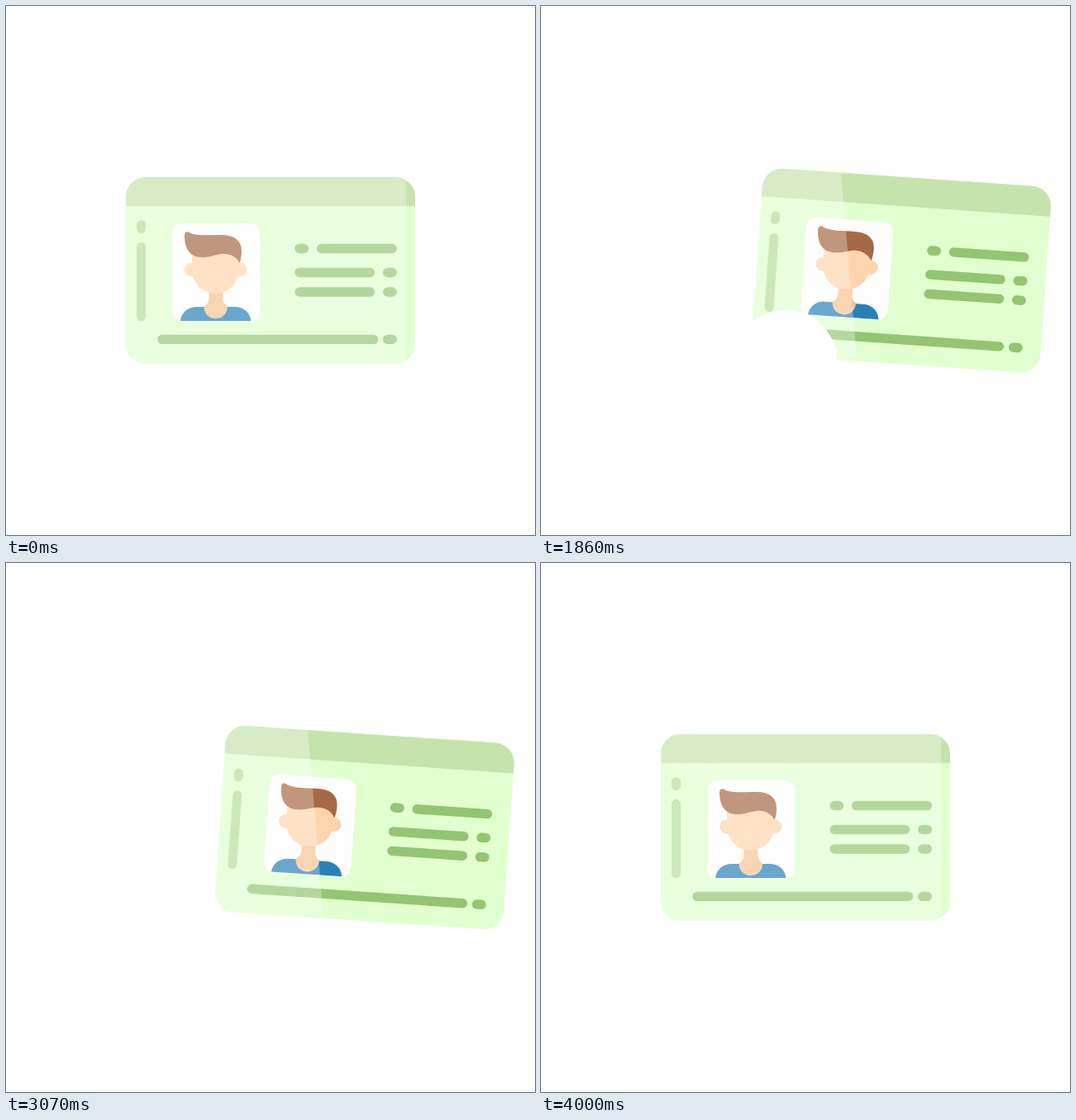
Recreate the animation shown at these times as an HTML page without scripts. Size 640 by 640 pixels, loop 6 s.

```html
<!DOCTYPE html>
<html lang="en">
<head>
<meta charset="utf-8">
<title>ID card</title>
<style>
  /* Clock in 25ths of a second, shown at 14 pictures per second */
  @property --f {
    syntax: "<integer>";
    inherits: true;
    initial-value: 0;
  }
  @keyframes clock {
    from { --f: 0; }
    to { --f: 150; }
  }
  html, body {
    margin: 0;
    height: 100%;
    overflow: hidden;
    background: #fff;
  }
  svg {
    display: block;
    width: 100%;
    height: 100%;
    animation: clock 6s steps(84) -5ms infinite;

    /* slide out during second 0-1, back during second 3-4 */
    --t: (clamp(0, var(--f) / 25, 1) - clamp(0, (var(--f) - 75) / 25, 1));
    --p: (var(--t) * var(--t) * (3 - 2 * var(--t)));

    /* flash: growth and fade */
    --g: (1 - clamp(0, (var(--f) - 45) / 10, 1));
    --s: clamp(0, (var(--f) - 45) / 18, 1);
  }
  .card {
    transform-origin: 320px 320px;
    transform: translateX(calc(var(--p) * 116px)) rotate(calc(var(--p) * 4deg));
  }
  .shine {
    fill: #fff;
    opacity: .3;
    transform-origin: 484px 320px;
    transform: translate(calc(var(--p) * -111.6px), calc(var(--p) * -7px)) rotate(calc(var(--p) * -4.9deg));
  }
  .flash {
    fill: #fff;
    transform-origin: 296px 430px;
    transform: scale(calc(1 - var(--g) * var(--g)));
    opacity: calc(1 - var(--s) * var(--s) * (3 - 2 * var(--s)));
  }
  .lines {
    fill: none;
    stroke: #93c572;
    stroke-width: 11.4;
    stroke-linecap: round;
  }
  .side { stroke: #b6de9c; stroke-width: 11; }
  .skin { fill: #fed4ad; }
</style>
</head>
<body>
<svg viewBox="0 0 640 640">
  <g class="card">
    <rect x="145" y="207" width="350" height="226" rx="24" fill="#e1ffcf"/>
    <path d="M145 242.300V231a24 24 0 0 1 24-24H471a24 24 0 0 1 24 24V242.300Z" fill="#c5e4ac"/>
    <path class="lines side" d="M163.500 264.500v5M163.500 291.300v84.500"/>
    <path class="lines" d="M355 293.500h5.500M381.700 293.500h85.500
      M355 322.500h85.500M461.700 322.500h5.500
      M355 346h85.500M461.700 346h5.500
      M189 403.400h255.500M461.700 403.400h5.500"/>

    <rect x="201.500" y="263" width="105.500" height="118.500" rx="12" fill="#fdfdfd"/>
    <path d="M211 381c1-10 9-17 20-17h45.500c11 0 19 7 20 17z" fill="#2980b9"/>
    <path d="M245.500 342h17v12q0 6 5.500 9.500c0 19.500-28.500 19.500-28.500 0q6-3.500 6-9.500z" fill="#f5c291"/>
    <g class="skin">
      <circle cx="224.500" cy="319" r="8.500"/>
      <circle cx="283" cy="319" r="8.500"/>
      <path d="M225 292v26c0 17 12 29.500 28.500 29.500s28.500-12.500 28.500-29.500v-10l-10-14z"/>
    </g>
    <path d="M216 277.500c0-4 3-5.500 6.500-3 9 4 25 2.500 38 2.500 16 0 24.500 7 24.500 19 0 6-.8 10.500-2.200 15
      -4.300-8-11.800-11.500-20.300-11.300-8 .3-14.500 4.300-25.500 4.300-15 0-21-11-21-26.500z" fill="#a56a45"/>
  </g>
  <rect class="shine" x="-60" y="60" width="544" height="373"/>
  <circle class="flash" cx="296" cy="430" r="327"/>
</svg>
</body>
</html>
```
